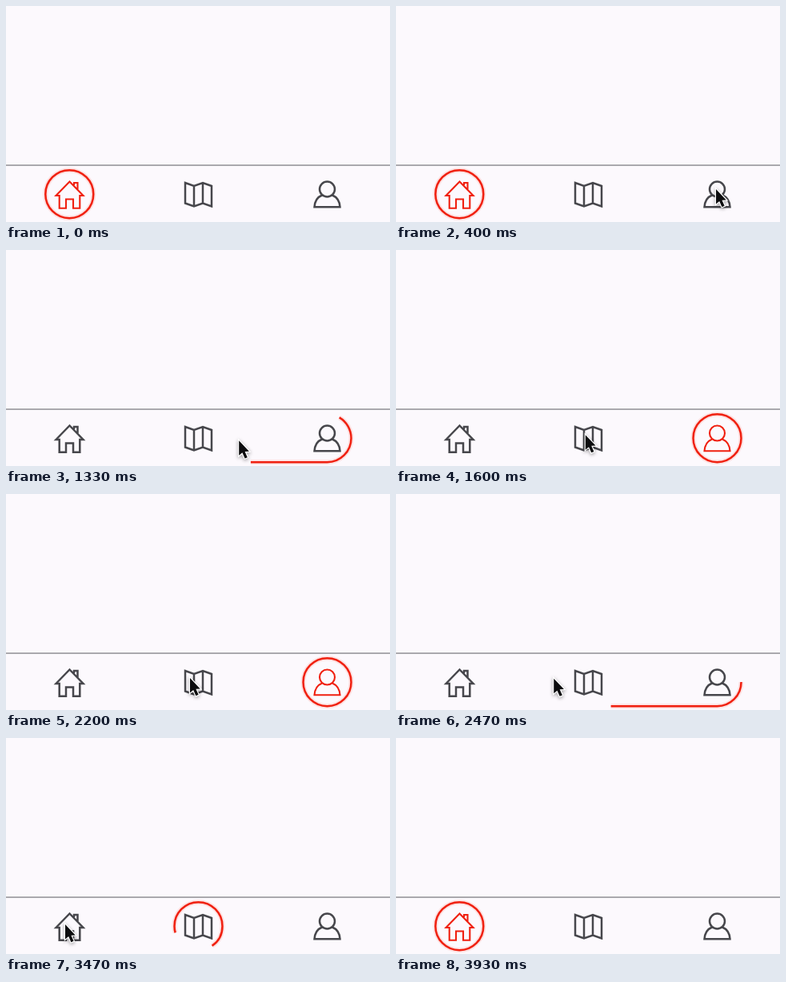
Recreate the animation shown at these times as an HTML page with a canvas. Size 480 px wide and 270 px high, loop 4.07 s.

```html
<!DOCTYPE html>
<html lang="en">
<head>
<meta charset="utf-8">
<title>Tab bar</title>
<style>
  html, body { margin: 0; width: 100%; height: 100%; overflow: hidden; background: #fcf9fd; }
  canvas { display: block; width: 480px; height: 270px; filter: blur(.4px); }
</style>
</head>
<body>
<canvas id="stage" width="480" height="270"></canvas>
<script>
const ctx = document.getElementById('stage').getContext('2d');
const BG = '#fcf9fd', LINE = '#818085', GREY = '#47474c', RED = '#f02010';
const LOOP = 4070, FPS = 15;
const CY = 235.2, R = 30, RING = 2 * Math.PI * R;
const TABS = [79.3, 240.5, 401.5];

// Times are in ticks of 1/15 s; a move becomes visible at "show"
const MOVE_TICKS = 10.25;
const MOVES = [
  { from: 0, to: 2, start: 12.33, show: 14 },
  { from: 2, to: 1, start: 31.21, show: 35 },
  { from: 1, to: 0, start: 48.16, show: 52 }
];

const ENTRY = { x: 402, y: 278 };
const LEGS = [
  { start: 0, end: 7, x: 400, y: 228, dip: 0 },
  { start: 16, end: 26, x: 230, y: 230, dip: 10 },
  { start: 36, end: 45, x: 74, y: 233, dip: 0 },
  { start: 53, end: 59, x: 79, y: 278, dip: 0 }
];

const ICONS = [
  'M62.5 237L79.5 219.5L96.5 237H92.3V252.7H84V241.5H75V252.7H66.7V237Z M85 224V221H89.5V229',
  'M224 221L235 225L246 221L257 225V250.5L246 246.5L235 250.5L224 246.5Z M235 225V250.5 M246 221V246.5',
  'M411 229A9.5 9.5 0 1 1 392 229A9.5 9.5 0 1 1 411 229Z M395 236.5C389 239 386 244 385.5 251.3H417.5C417 244 414 239 408 236.5'
].map(d => new Path2D(d));
const ARROW = new Path2D('M0 0V18.5L4.2 15L7.4 22.2L10.6 20.8L7.4 13.7L12.7 13.4Z');

const clamp = v => Math.min(1, Math.max(0, v));
const smooth = p => p * p * (3 - 2 * p);
const easeOut = p => 1 - (1 - p) * (1 - p);

function selection(n) {
  const move = MOVES.filter(m => m.show <= n).pop();
  if (!move) return { to: 0, p: 1 };
  return { from: move.from, to: move.to, p: clamp((n - move.start) / MOVE_TICKS) };
}

function ring(x, ccw) {
  const h = Math.PI / 2;
  ctx.arc(x, CY, R, h, -h, ccw);
  ctx.arc(x, CY, R, -h, h, ccw);
}

function strokeRing() {
  ctx.strokeStyle = 'rgba(255,70,50,.14)';
  ctx.lineWidth = 6;
  ctx.stroke();
  ctx.strokeStyle = RED;
  ctx.lineWidth = 2.5;
  ctx.stroke();
}

// One stroke runs round the old tab, along the floor and round the new tab
function drawSelector({ from, to, p }) {
  ctx.beginPath();
  if (p === 1) {
    ring(TABS[to], false);
    strokeRing();
    return;
  }
  const a = TABS[from], b = TABS[to], ccw = b > a;
  const lead = RING + Math.abs(b - a), total = lead + RING;
  const head = smooth(p);
  const lag = .383 * Math.pow(head / (1 - head), 1.45);
  const start = lead * lag / (1 + lag);
  ring(a, ccw);
  ctx.lineTo(b, CY + R);
  ring(b, ccw);
  ctx.setLineDash([total * head - start, total * 2]);
  ctx.lineDashOffset = -start;
  strokeRing();
  ctx.setLineDash([]);
}

function drawIcon(path, active) {
  ctx.strokeStyle = active ? RED : GREY;
  ctx.lineWidth = active ? 2.1 : 2.5;
  ctx.stroke(path);
}

function drawPointer(n) {
  let { x, y } = ENTRY;
  for (const leg of LEGS) {
    const k = easeOut(clamp((n - leg.start) / (leg.end - leg.start)));
    x += (leg.x - x) * k;
    y += (leg.y - y) * k + leg.dip * Math.sin(Math.PI * k);
  }
  if (y > 272) return;
  ctx.save();
  ctx.translate(x, y);
  ctx.shadowColor = 'rgba(0,0,0,.4)';
  ctx.shadowBlur = 4;
  ctx.shadowOffsetY = 1.5;
  ctx.strokeStyle = '#fff';
  ctx.lineWidth = 2.4;
  ctx.stroke(ARROW);
  ctx.shadowColor = 'transparent';
  ctx.fillStyle = '#0c0c0e';
  ctx.fill(ARROW);
  ctx.restore();
}

function draw(ms) {
  const n = Math.floor((ms % LOOP) * FPS / 1000 + .06);
  const sel = selection(n);
  ctx.fillStyle = BG;
  ctx.fillRect(0, 0, 480, 270);
  ctx.fillStyle = LINE;
  ctx.fillRect(0, 198.4, 480, 1.3);
  ICONS.forEach((path, i) => drawIcon(path, sel.p === 1 && sel.to === i));
  drawSelector(sel);
  drawPointer(n);
}

let origin = null;
function loop(now) {
  if (origin === null) origin = now;
  draw(now - origin);
  requestAnimationFrame(loop);
}
draw(0);
requestAnimationFrame(loop);
</script>
</body>
</html>
```
